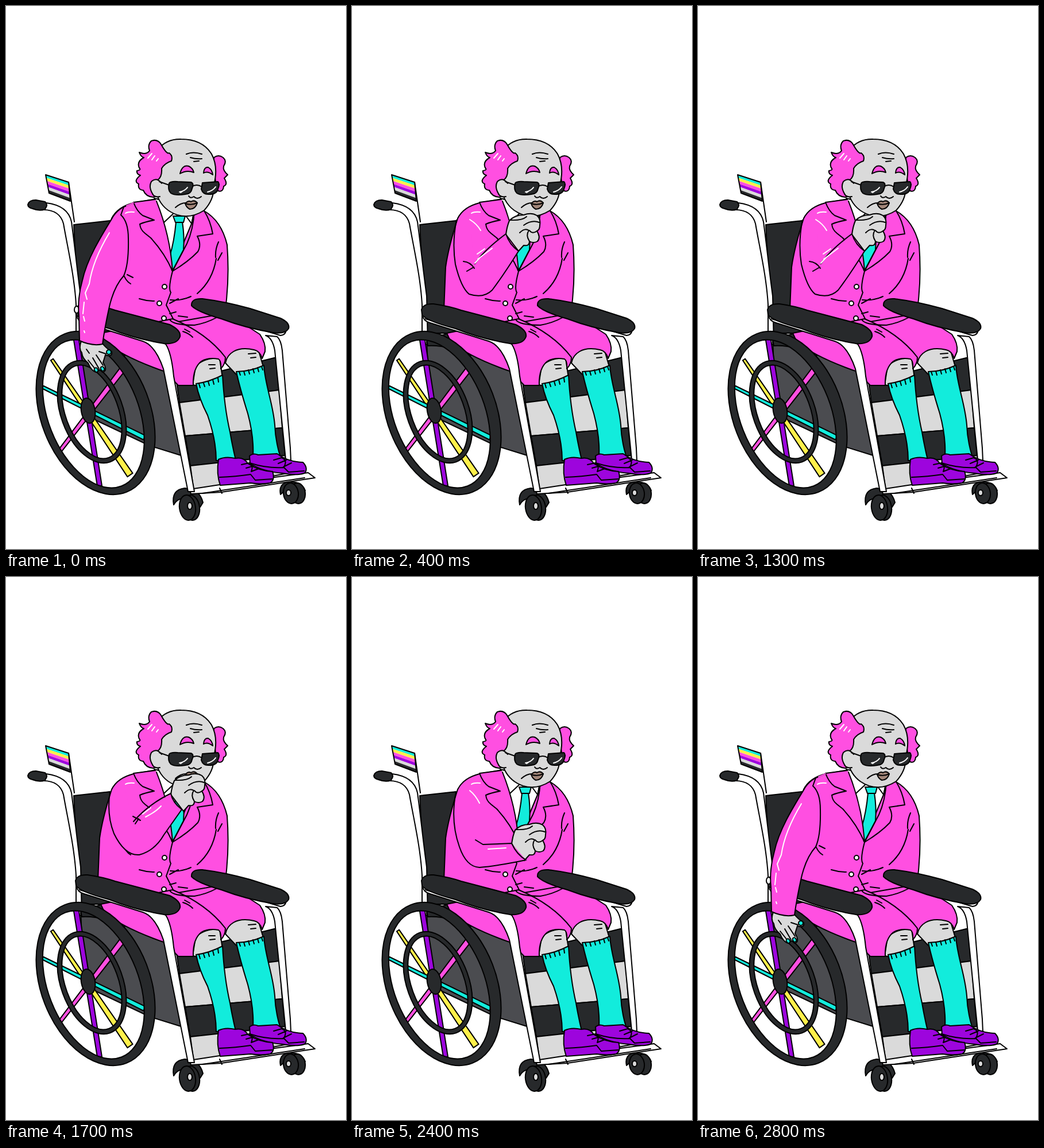
Recreate the animation shown at these times as an HTML page. Size 592 by 946 pixels, loop 2.9 s.

```html
<!DOCTYPE html>
<html>
<head>
<meta charset="utf-8">
<style>
html, body { margin: 0; width: 100%; height: 100%; overflow: hidden; background: #fff; }
svg { display: block; width: 592px; height: 946px; }
path, ellipse, circle { stroke-width: 2; stroke-linejoin: round; stroke-linecap: round; }
</style>
</head>
<body>
<svg id="stage" viewBox="0 0 592 946"></svg>
<script>
const PINK = '#ff4fe1', SKIN = '#dadada', DARK = '#27292b', PANEL = '#4b4c50',
  CYAN = '#12ecdc', PURPLE = '#9d05dd', YELLOW = '#fff04a', WHITE = '#fff';

const shape = (d, fill, stroke = '#000') => `<path d="${d}" fill="${fill}" stroke="${stroke}"/>`;
const line = (d, color = '#000') => shape(d, 'none', color);
const shine = d => line(d, WHITE);
const oval = (x, y, rx, ry, fill, turn = 0) =>
  `<ellipse cx="${x}" cy="${y}" rx="${rx}" ry="${ry}" fill="${fill}" stroke="#000" transform="rotate(${turn} ${x} ${y})"/>`;
// A bar that widens from half-width a to half-width b
const spoke = (x, y, u, v, a, b, color) => {
  const len = Math.hypot(u - x, v - y), nx = (y - v) / len, ny = (u - x) / len;
  return shape(`M${x + nx * a} ${y + ny * a}L${u + nx * b} ${v + ny * b}L${u - nx * b} ${v - ny * b}L${x - nx * a} ${y - ny * a}Z`, color);
};
const group = (id, body) => `<g id="${id}">${body}</g>`;

function flag() {
  const colors = [CYAN, YELLOW, PINK, PURPLE, SKIN, DARK];
  const stripes = colors.map((c, i) => {
    const a = i / 6, b = (i + 1) / 6;
    return shape(`M${69 + 6 * a} ${294 + 32 * a}L${109 + 3 * a} ${307 + 33 * a}L${109 + 3 * b} ${307 + 33 * b}L${69 + 6 * b} ${294 + 32 * b}Z`, c, 'none');
  }).join('');
  return line('M109 307L119 376') + stripes + line('M69 294L109 307L112 340L75 326Z');
}

function back() {
  return shape('M118 381L181 374L195 400V570H128Z', DARK) +
    shape('M70 343C94 346 110 357 114 376C120 420 124 462 130 505L132 590L122 590L122 520C119 470 108 425 100 379C96 364 84 355 65 355Z', WHITE) +
    shape('M38 346Q40 338 52 338L68 341Q74 346 68 354Q59 358 46 353Q38 351 38 346Z', DARK);
}

function panel() {
  return shape('M130 582L168 578L278 632L308 784L250 766L136 712Z', PANEL) +
    shape('M130 582L168 570L212 600L205 612Q170 590 132 592Z', DARK);
}

function calfStrap() {
  const edges = [[297, 655, 471, 612], [302, 691, 476, 669], [312, 749, 481, 735], [321, 801, 486, 783], [327, 846, 490, 814]];
  return [DARK, SKIN, DARK, SKIN].map((c, i) => {
    const [a, b, x, y] = edges[i], [e, f, g, h] = edges[i + 1];
    return shape(`M${a} ${b}L${x} ${y}L${g} ${h}L${e} ${f}Z`, c);
  }).join('');
}

function wheel() {
  const ring = (a, b, x = 0) => `M${x - a} 0A${a} ${b} 0 1 0 ${x + a} 0A${a} ${b} 0 1 0 ${x - a} 0Z`;
  return spoke(80, 616, 216, 817, 2.5, 5.5, YELLOW) + spoke(64, 664, 241, 752, 2.5, 4, CYAN) +
    spoke(90, 780, 209, 625, 3, 5, PINK) + spoke(122, 579, 163, 836, 4.5, 4, PURPLE) +
    `<g fill-rule="evenodd"><g transform="translate(156 709) rotate(-21.3)">${shape(ring(95, 148) + ring(79, 135, -4), DARK)}</g>
    <g transform="translate(149.5 707) rotate(-20)">${shape(ring(54, 93) + ring(46, 85), DARK)}</g></g>` +
    oval(143, 705, 12, 22, DARK, -10);
}

function torso() {
  return shape('M262 336L222 343Q194 350 184 370Q168 420 163 455L160 530L200 570L330 560L383 520Q389 470 385 416Q375 374 345 357L328 355Z', PINK) +
    shape('M258 335L272 376L289 461L324 377L328 352Z', WHITE) +
    shape('M296 376L307 376Q311 402 309 425L290 461L285 436Q293 410 296 376Z', CYAN) +
    shape('M291 366H312L309 377H295Z', CYAN) +
    line('M260 338L274 378L291 362M312 364L323 379L328 357') +
    shape('M260 337L222 342Q228 358 238 365L258 373Q242 376 233 380Q234 390 242 396L252 404Q276 430 290 462Q286 400 262 340', PINK) +
    shape('M328 357L345 357Q356 374 360 397L333 401Q341 416 334 428Q318 445 290 462L315 414Q326 390 328 357', PINK) +
    line('M290 462Q282 492 287 499L279 521L291 545L300 552M232 510Q245 514 258 514M286 512Q305 514 322 506M300 510L285 518M300 540L316 542M296 533L285 536') +
    line('M370 411Q364 424 365 438M376 430L369 443M366 440Q360 478 333 501M203 464Q208 479 217 484M211 468L221 473') +
    [[276, 489], [267, 518], [275, 544]].map(([x, y]) => oval(x, y, 4, 4, WHITE)).join('');
}

function legs() {
  return shape('M382 622L388 601Q420 592 440 601L449 632L401 642Z', SKIN) +
    shape('M325 660L330 628Q345 612 372 614L377 648L334 662Z', SKIN) +
    shape('M300 550L385 535L442 572Q453 588 451 602L446 614Q442 601 432 599Q410 594 396 602Q386 608 382 620Z', PINK) +
    shape('M165 570L290 545Q350 570 382 612Q382 624 374 632Q375 618 370 615Q352 612 340 619Q325 631 326 661L300 661L277 637Q205 612 172 585Z', PINK) +
    line('M285 546Q290 556 328 556Q350 552 366 543M308 567Q318 570 325 577M311 563L320 568') +
    line('M422 606L435 605M426 613L435 612M353 625L364 625M355 632L364 631') +
    shape('M401 637Q425 637 449 626C451 661 465 692 468 730Q469 757 477 783L430 785Q432 751 421 710Q407 665 401 637Z', CYAN) +
    shape('M331 658Q354 655 377 643C379 680 384 716 390 742Q394 766 400 791L366 792Q366 756 351 713Q336 684 331 658Z', CYAN) +
    line('M336 658L338 665M344 657L346 663M352 654L354 661M360 651L362 659M369 648L370 655M406 637L408 643M414 636L416 643M422 634L424 641M430 632L432 639M438 630L440 637M445 628L447 634');
}

function shoes() {
  return shape('M424 784Q430 778 439 782L472 780Q490 794 517 795Q526 804 521 813Q510 819 482 814Q446 811 425 797Z', PURPLE) +
    shape('M370 790Q382 784 399 788Q414 785 421 797Q440 810 464 811Q469 825 460 831Q444 834 426 831L373 835Q366 815 370 790Z', PURPLE) +
    line('M424 796Q455 806 484 804L492 812L519 810M372 821Q400 820 426 816L434 826L464 824') +
    line('M410 799L424 796M418 805L432 801M427 811L440 806M422 797Q432 798 427 811M466 791L480 787M474 797L488 791M483 803L497 796M479 787Q491 790 484 803');
}

function farRest() {
  return shape('M385 546L478 574Q488 573 488 562L385 535Z', WHITE) +
    shape('M452 574Q464 578 468 600L487 790L489 815L497 815L495 770L481 600Q479 582 472 576Z', WHITE) +
    shape('M323 522Q322 509 342 510Q382 515 425 527L478 544Q495 552 492 562Q486 572 465 569Q417 561 375 545Q333 533 323 522Z', DARK);
}

function nearRest() {
  return shape('M122 537Q124 549 136 552L238 584Q260 591 274 632L317 846L328 846L292 645Q288 604 278 589L180 545Z', WHITE) +
    line('M128 545L250 582Q264 587 280 587') +
    shape('M121 529Q124 518 142 519Q170 523 190 530L285 555Q305 565 303 576Q298 590 275 588Q225 580 180 562Q130 549 122 538Z', DARK);
}

function casters() {
  return shape('M292 869Q287 843 311 840Q337 841 343 865L338 873L320 862Q302 852 292 869Z', DARK) +
    oval(323, 874, 14, 22, DARK, -8) + oval(316, 874, 14, 22, DARK, -8) + oval(320, 871, 4, 6, SKIN) +
    shape('M478 851Q474 832 492 829Q515 828 521 844L515 856L490 840Z', DARK) +
    oval(508, 849, 13, 18, DARK, -8) + oval(496, 849, 13, 18, DARK, -8) + oval(492, 848, 4, 5, SKIN);
}

function footplate() {
  return shape('M320 842L372 834L526 813L538 822L375 847L322 850Z', WHITE) + line('M372 840L376 849M342 849L520 822');
}

function head() {
  return shape('M362 264Q370 258 378 264Q385 270 379 279Q377 286 386 294Q382 298 380 300Q387 311 379 314Q378 325 369 322Q360 292 362 264Z', PINK) +
    shape('M264 250Q280 231 305 232Q342 232 358 258Q370 280 362 312Q363 337 345 356Q322 371 298 364Q273 355 264 332Z', SKIN) +
    shape('M270 241Q264 231 253 235Q246 242 250 252Q244 260 232 255Q235 263 240 264Q227 271 232 282Q236 286 228 287Q227 293 234 295Q221 305 231 310Q229 320 239 321Q244 333 258 333L264 303Q272 298 271 283Q276 274 288 270Q291 261 284 256Q280 259 270 241Z', PINK) +
    shape('M271 309Q262 297 253 306Q248 315 255 327Q258 334 268 332', SKIN) +
    shine('M247 265L254 257M254 268L259 261M262 270L265 266') +
    line('M314 258Q326 253 341 258M321 264Q331 267 341 266M327 271L336 270') +
    shape('M303 292Q307 276 318 279Q325 282 327 290Q315 285 303 292Z', PINK) +
    shape('M344 291Q345 280 352 281Q359 285 360 294Q351 287 344 291Z', PINK) +
    line('M267 306L284 312M323 315Q332 309 341 315M318 331Q321 336 327 332Q333 338 340 332') +
    shape('M284 309Q286 305 299 306L322 307Q328 309 324 318Q322 328 312 328Q295 331 287 326Q281 320 284 309Z', DARK) +
    shape('M342 308L369 306Q373 309 369 319Q367 328 354 328Q343 329 340 319Z', DARK) +
    shine('M302 324Q312 322 316 316M307 323L304 325M351 324Q360 322 365 315') +
    line('M295 351Q304 343 313 343') +
    group('shut', shape('M312 344Q318 338 322 341Q328 337 333 343Q330 354 320 354Q314 351 312 344Z', '#a28679') + line('M312 344Q322 348 333 343')) +
    group('open', shape('M310 347Q316 338 322 341Q330 336 334 343Q332 355 320 356Q312 354 310 347Z', '#a28679') + shape('M313 348Q322 342 331 345Q329 350 317 352Z', SKIN));
}

const fist = shape('M268 398Q270 383 274 374Q283 364 299 364Q312 359 322 365Q329 371 327 382Q327 390 322 392Q329 403 323 410Q316 414 309 410Q309 419 299 417L290 427Z', SKIN) +
  line('M276 373Q296 374 304 367M299 382Q313 372 326 377M322 392Q314 398 309 391M309 410Q302 399 308 391M292 395Q301 386 308 391');
const shoulder = shine('M208 361Q213 358 223 359');

const arms = {
  down: oval(123, 529, 4, 6, WHITE) +
    shape('M131 584Q126 597 132 604Q133 614 143 622Q149 637 158 638Q162 630 168 638Q178 636 169 621L173 608Q186 612 184 602Q174 596 168 588Z', SKIN) +
    line('M143 617L155 632M151 613L162 632M157 608L169 626M162 602L174 606M140 598L145 605') +
    oval(157, 634, 3, 4, CYAN, -30) + oval(168, 632, 3, 4, CYAN, -30) + oval(179, 603, 4, 4, CYAN) +
    shape('M222 343Q194 351 184 371C165 402 141 441 133 478Q124 509 127 540L128 583Q150 593 168 589Q172 560 179 528Q187 490 205 470Q214 450 213 405Q213 376 200 364L205 350Z', PINK) +
    line('M222 343L210 348', PINK) +
    shine('M180 395Q151 443 145 484L138 500L141 511M136 516L134 536M135 541L137 549M136 566L137 569') + shoulder,
  lap: shape('M300 501Q312 493 327 494Q335 498 325 503L315 509Q332 517 344 519Q346 526 335 528Q346 536 331 538Q318 546 301 538L287 523Z', SKIN) +
    line('M316 510Q317 519 336 521M313 518L335 528M309 527L330 538') +
    oval(326, 498, 4, 3, CYAN) + oval(340, 522, 4, 3, CYAN, -25) +
    shape('M186 374Q174 405 177 445Q181 478 207 508Q235 526 288 534L284 516Q290 503 302 501L238 471L222 380L205 358Z', PINK, 'none') +
    line('M180 374Q172 411 178 448Q185 485 208 508Q236 526 291 535Q278 510 302 501Q270 482 239 472L228 476M232 461L239 472M207 363Q224 376 227 400Q230 420 234 435') +
    shine('M217 397Q219 415 224 425L224 438M241 480L253 483M261 484L282 492') + shoulder,
  lift: `<g transform="translate(10 67)">${fist}</g>` +
    shape('M186 374Q172 425 187 470Q199 505 222 506Q250 504 303 493Q290 478 278 464L234 465L212 430L205 358Z', PINK, 'none') +
    line('M181 375Q171 425 187 470Q199 505 222 506Q250 504 303 493Q287 484 278 464L228 466L215 458') +
    shine('M205 372Q215 380 222 394M237 474L268 472') + shoulder,
  chin: fist +
    shape('M186 374Q172 415 182 455Q190 493 208 506Q235 509 258 477L290 427Q274 416 268 397L212 447L205 358Z', PINK, 'none') +
    line('M182 373Q174 412 180 450Q190 491 204 502Q229 510 244 495Q263 470 290 427Q274 416 268 397Q230 425 214 449M194 445Q206 446 213 457M212 455L200 462') +
    shine('M205 372Q218 380 224 391M214 448L223 438M218 432L231 423M219 441L244 422') + shoulder,
  cough: `<g transform="translate(19 -19)">${fist}</g>` +
    shape('M186 374Q174 413 188 447Q207 486 234 484Q259 474 275 449L306 405Q290 393 287 377L220 424L205 358Z', PINK, 'none') +
    line('M181 375Q175 414 188 447Q207 486 232 484Q259 477 275 449L306 405Q290 393 287 377Q248 396 222 426M221 417L234 424M231 421L225 430') +
    shine('M238 413L252 402M243 418Q261 409 270 399') + shoulder
};

const stage = document.getElementById('stage');
stage.innerHTML = flag() + back() + panel() + calfStrap() + torso() + legs() + farRest() + wheel() +
  casters() + footplate() + nearRest() + shoes() + group('head', head()) +
  Object.keys(arms).map(k => group(k, arms[k])).join('');

// Start time, arm pose, head lowered
const cues = [
  [0, 'down'], [100, 'lap'], [300, 'lift'], [400, 'chin'],
  [800, 'chin', 1], [1000, 'chin'], [1100, 'chin', 1], [1300, 'chin'], [1400, 'chin', 1], [1600, 'chin'],
  [1700, 'cough'], [1800, 'cough', 1], [1900, 'cough'], [2000, 'cough', 1], [2100, 'cough'],
  [2200, 'chin'], [2400, 'lift'], [2500, 'lap'], [2800, 'down']
];
const el = id => document.getElementById(id);
const show = (id, on) => { el(id).style.display = on ? '' : 'none'; };
const start = performance.now();

function draw() {
  const t = (performance.now() - start) % 2900;
  const [, pose, low] = cues.filter(c => c[0] <= t).pop();
  for (const k in arms) show(k, k === pose);
  show('open', low);
  show('shut', !low);
  el('head').setAttribute('transform', `translate(0 ${low ? 7 : 0})`);
  requestAnimationFrame(draw);
}
draw();
</script>
</body>
</html>
```
